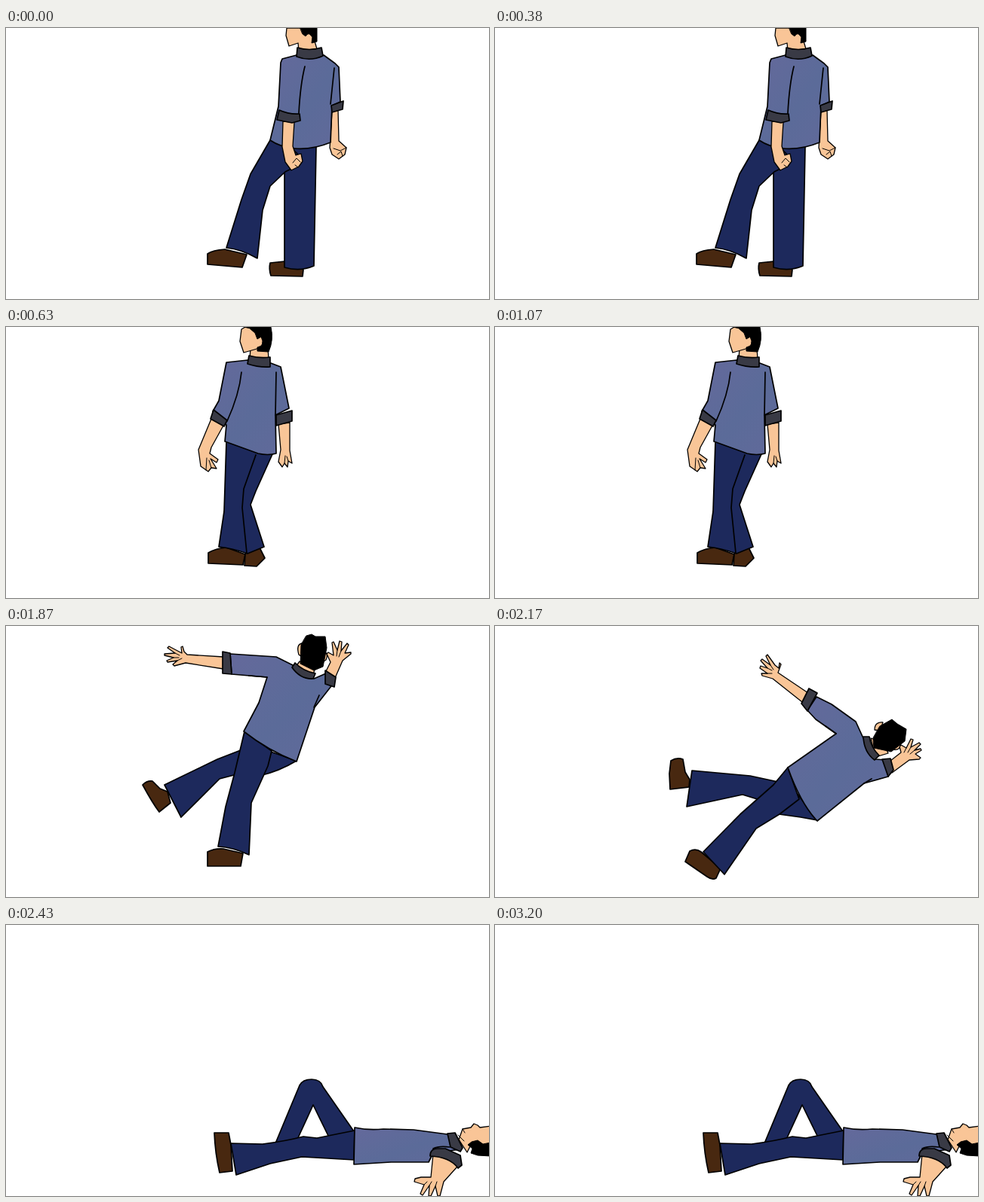
An HTML page for the animation above (3710 ms loop, 640 by 360 pixels).

```html
<!DOCTYPE html>
<html lang="en">
<head>
<meta charset="utf-8">
<title>Falling man</title>
<style>
html, body { margin: 0; width: 100%; height: 100%; overflow: hidden; background: #fff; }
svg { display: block; width: 100vw; height: 100vh; }
path { stroke: #000; stroke-width: 1.7; stroke-linejoin: round; stroke-linecap: round; }
.skin { fill: #f9c597; stroke-width: 1.3; }
.hair { fill: #000; stroke-width: 1; }
.shirt { fill: url(#cloth); }
.cuff { fill: #393a45; }
.jeans { fill: #1d295c; }
.shoe { fill: #482810; }
.seam { fill: none; }
.crease { fill: none; stroke-width: 1; }
.alert { fill: #f00; stroke: none; }
</style>
</head>
<body>
<svg id="stage" viewBox="0 0 640 360" xmlns="http://www.w3.org/2000/svg">
  <defs>
    <linearGradient id="cloth" x1="0" y1="0" x2="1" y2="1">
      <stop offset="0" stop-color="#64699b"/>
      <stop offset=".55" stop-color="#5b6b99"/>
      <stop offset="1" stop-color="#61699a"/>
    </linearGradient>
  </defs>
</svg>
<script>
// Each pose lists its parts from back to front.
const poses = [
  { hold: 630, parts: [ // walking in
    ['shoe', 'M350 312L369 310L394 321L393 330L351 329Q348 320 350 312Z'],
    ['shoe', 'M267 300Q274 295 290 294L319 301L313 318L267 314Z'],
    ['jeans', 'M380 160L411 158L408 316Q390 324 369 318L369 188Z'],
    ['jeans', 'M350 149L380 161L387 168L380 186L370 191L350 210L340 242L333 306Q312 294 292 292L312 228L324 194Z'],
    ['skin', 'M432 111L440 109L441 150L451 159L449 168L441 174L432 168L429 159Z'],
    ['crease', 'M434 160L443 163L451 159M439 168L444 164L446 170'],
    ['skin', 'M372 0L371 10L375 24L387 20L388 30L412 28L408 14L396 0Z'],
    ['hair', 'M390 0H412L412 18L405 20L406 12Q401 4 397 11L393 8Z'],
    ['shirt', 'M366 41L385 36L421 36L436 47L441 52L443 98L432 103L430 152Q406 162 382 160Q363 158 350 149L361 104L364 46Z'],
    ['cuff', 'M386 26Q402 31 418 26L420 37Q403 45 385 38Z'],
    ['cuff', 'M431 103L447 97L446 108L432 112Z'],
    ['skin', 'M367 124L382 125L380 157L384 169L391 167L393 177L388 184L378 189L370 178L366 158Z'],
    ['crease', 'M380 179L385 173L390 178M383 182L387 185'],
    ['cuff', 'M362 109Q375 115 389 114L390 123L379 126L359 122Z'],
    ['seam', 'M396 51Q390 75 388 113M435 53L430 101']
  ]},
  { hold: 740, parts: [ // leaning back
    ['shoe', 'M268 300Q278 294 292 293L317 302L314 316L268 314Z'],
    ['shoe', 'M317 301L336 293L343 307L332 318L316 317Z'],
    ['jeans', 'M292 152L337 168L353 169L331 218L324 236L342 292L320 301Q300 294 282 292L289 245Z'],
    ['seam', 'M331 170L315 215L313 240L319 300'],
    ['skin', 'M361 129L376 127L376 164L379 181L374 178L373 186L369 181L366 186L361 179L364 163Z'],
    ['skin', 'M272 122L288 131L272 160L270 168L281 176L279 180L271 175L279 188L272 187L268 192L258 185L255 163Z'],
    ['crease', 'M265 190L266 174M272 187L269 177M369 181L370 171M374 178L372 172'],
    ['skin', 'M324 27L347 27L348 43H323Z'],
    ['skin', 'M312 3L317 0H331L341 17L339 27L329 30L315 34L310 19Z'],
    ['hair', 'M316 0H351Q355 17 348 33L333 32L333 27Q344 25 338 13L333 16L330 8L323 2Z'],
    ['shirt', 'M292 47L320 44L351 48L364 53L375 108L357 117L358 168Q347 171 334 168L290 152L292 130L274 112L282 98Z'],
    ['cuff', 'M322 38Q336 42 350 40V53Q335 54 320 49Z'],
    ['cuff', 'M275 110L293 124L289 132L271 122Z'],
    ['cuff', 'M358 117L379 111V125L358 131Z'],
    ['seam', 'M312 60Q309 90 293 125M358 60L357 117']
  ]},
  { hold: 500, parts: [ // startled
    ['alert', 'M99 34Q101 25 107 28Q110 45 118 72Q102 52 99 34Z'],
    ['alert', 'M118 79A3.6 3.6 0 0 1 125 79A3.6 3.6 0 0 1 118 79Z'],
    ['shoe', 'M267 308Q269 300 276 296L312 289L314 301L272 321Z'],
    ['shoe', 'M312 289L328 274L335 286L322 301L314 303Z'],
    ['jeans', 'M224 165L286 155L288 227L329 268L312 289L274 296L261 250L246 217Z'],
    ['seam', 'M267 163L271 213L284 240L312 289'],
    ['skin', 'M275 116L287 105L300 139L313 157L306 154L307 162L301 157L298 161L291 153L292 142Z'],
    ['skin', 'M194 148L210 149L207 186L222 193L214 197L229 203L226 206L216 202L223 211L212 211L203 205L194 188Z'],
    ['crease', 'M214 197L207 196M216 202L209 200M212 211L207 202M301 157L298 149M306 154L301 149'],
    ['skin', 'M199 40L218 37L223 45L201 52Z'],
    ['skin', 'M177 21L190 14L202 21L209 25L204 40L190 50L182 41Z'],
    ['hair', 'M171 14L174 9L190 3L205 2L214 10L218 38L204 40L203 36Q212 26 203 22L199 28L196 20L188 18L178 20Z'],
    ['shirt', 'M177 69L199 59L230 46L243 45L280 92L267 108L271 116L289 151L272 159L250 164L222 165L210 139L190 134L183 96Z'],
    ['cuff', 'M199 50Q216 41 228 41L232 50Q218 52 203 60Z'],
    ['cuff', 'M190 135L214 140L213 150L189 147Z'],
    ['cuff', 'M267 107L281 91L288 102L271 117Z'],
    ['seam', 'M200 70Q210 100 211 139M240 55L268 110']
  ]},
  { hold: 300, parts: [ // tipping over
    ['shoe', 'M181 211Q187 205 194 206L204 216L214 220L218 235L203 247Q194 235 181 211Z'],
    ['shoe', 'M267 300Q277 295 288 296L314 302L311 319H267Z'],
    ['jeans', 'M316 163L280 177L210 211L232 254L283 203L306 197Z'],
    ['jeans', 'M345 165L385 179Q362 193 336 199Z'],
    ['jeans', 'M316 140L352 166L347 186L325 235L322 304Q301 294 281 293L291 240L303 195Z'],
    ['skin', 'M423 62L430 48L425 37L427 35L434 39L432 22L434 21L439 32L442 20L445 21L444 33L452 23L454 25L449 36L457 35V37L446 46L436 69Z'],
    ['skin', 'M288 41L240 38L236 34L234 27L232 28L233 36L216 27L214 29L224 36L210 37V39L222 42L213 46L214 48L227 46L221 51L223 53L238 49L288 57Z'],
    ['crease', 'M224 36L230 39M222 42L229 42M227 46L233 43M439 32L438 40M444 33L441 41'],
    ['skin', 'M389 47L409 57L407 66L384 54Z'],
    ['skin', 'M392 23Q384 25 388 38L392 41ZM420 34Q428 35 424 45L418 49Z'],
    ['shirt', 'M297 37L358 41L380 52L408 70L424 63L434 76L409 108L385 180Q348 166 315 140L335 102L346 68L299 64Z'],
    ['cuff', 'M383 49Q394 60 410 63L407 70Q390 71 379 55Z'],
    ['cuff', 'M287 34L297 36L299 64L287 63Z'],
    ['cuff', 'M423 59L437 68L435 81L423 77Z'],
    ['hair', 'M398 13L405 11L410 14L423 14L425 29L420 54L408 59L390 50L391 25Z'],
    ['seam', 'M346 68L322 66M408 108L415 92']
  ]},
  { hold: 260, parts: [ // falling
    ['shoe', 'M233 179Q241 174 249 177L252 194L258 204L257 214L232 217L231 196Z'],
    ['shoe', 'M252 313L258 299Q266 295 273 300L299 322L293 335Q288 338 281 333Z'],
    ['jeans', 'M375 207L338 199L261 192L254 240L328 224L354 232Z'],
    ['jeans', 'M400 222L427 258L405 254L376 250Z'],
    ['jeans', 'M388 188L403 230L377 250L346 269L304 330L276 300L325 250L369 211Z'],
    ['skin', 'M524 179L538 168L536 160L538 158L545 162L551 150L554 151L551 161L562 155L564 157L556 165L564 163L565 165L557 170L564 175L562 177L549 178L526 195Z'],
    ['skin', 'M407 101L368 70L354 66L353 63L361 63L351 56L352 53L361 56L352 46L354 44L365 52L359 40L361 38L371 52L376 56L377 49L379 51L375 62L415 89Z'],
    ['crease', 'M361 63L367 63M361 56L367 59M365 52L369 58M545 162L542 168M551 161L547 168M556 165L550 170'],
    ['skin', 'M498 149L504 174L521 169L515 155Z'],
    ['skin', 'M514 128Q503 127 503 138L510 139ZM528 164Q538 166 537 154L532 154Z'],
    ['shirt', 'M414 112L426 94L446 104L478 127L488 149L504 177L519 178L521 200L489 209L427 259Q405 236 388 188L452 143L425 124Z'],
    ['cuff', 'M488 147L496 147Q498 161 509 172L503 178Q489 168 488 147Z'],
    ['cuff', 'M406 103L416 83L427 89L414 113Z'],
    ['cuff', 'M513 177L524 176L528 191L521 200Z'],
    ['hair', 'M510 133L526 124L533 130L545 137L543 153L525 167L502 162L501 149Z'],
    ['seam', 'M452 143L438 133M489 209L499 203']
  ]},
  { hold: 1280, parts: [ // on the floor
    ['shoe', 'M276 276H295L298 292L300 327L283 329Q277 303 276 276Z'],
    ['jeans', 'M357 290L389 213Q393 205 405 205Q417 205 420 215L463 277L461 290L427 280L407 239L385 287Z'],
    ['jeans', 'M298 290L340 291Q371 287 394 281L412 283L462 273L461 312L392 308L350 317L305 332Z'],
    ['skin', 'M605 271L616 269L620 264L625 266L628 269L642 267V295L616 292L611 302L600 285Z'],
    ['hair', 'M642 289L632 291L625 286L617 288L612 292L618 297L616 303L625 306L642 307Z'],
    ['crease', 'M599 279L607 287M605 271L608 276'],
    ['shirt', 'M462 269Q480 273 500 271L540 272L585 278L602 298L566 303L560 315L510 315L461 318Z'],
    ['skin', 'M566 304Q585 301 598 321L580 341L575 360H572L569 347L563 360H560L561 346L552 359L549 357L554 345L541 341L542 337L550 335L563 335Z'],
    ['crease', 'M554 345L558 341M561 346L564 341M569 347L571 341'],
    ['cuff', 'M585 277L595 276L605 296L602 301L589 295Z'],
    ['cuff', 'M562 307Q562 297 572 297L582 297L602 306L604 319L599 323Q588 308 562 307Z'],
    ['seam', 'M566 297Q574 293 588 295']
  ]}
];

const NS = 'http://www.w3.org/2000/svg';
const stage = document.getElementById('stage');
const total = poses.reduce((sum, pose) => sum + pose.hold, 0);

function make(tag, attrs, parent) {
  const node = document.createElementNS(NS, tag);
  for (const key in attrs) node.setAttribute(key, attrs[key]);
  return parent.appendChild(node);
}

const groups = poses.map(pose => {
  const group = make('g', {}, stage);
  pose.parts.forEach(([part, d]) => make('path', { class: part, d }, group));
  return group;
});

function poseAt(time) {
  let left = time % total;
  return poses.findIndex(pose => (left -= pose.hold) < 0);
}

function draw(time) {
  const current = poseAt(time);
  groups.forEach((group, i) => group.style.display = i === current ? '' : 'none');
}

const start = performance.now();
function tick() {
  draw(performance.now() - start);
  requestAnimationFrame(tick);
}
tick();
</script>
</body>
</html>
```
